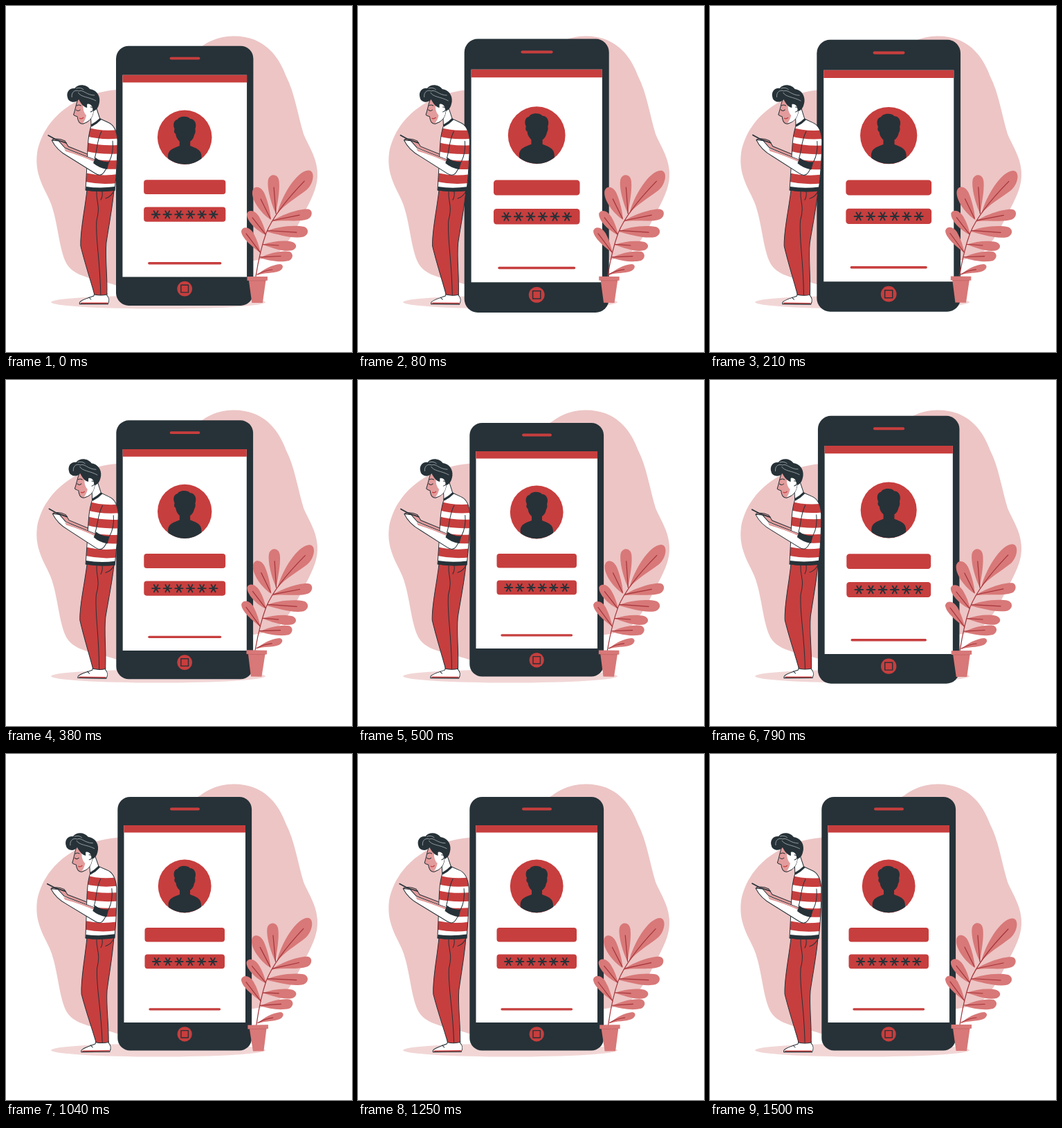
These frames come from a looping animation (500x500 px, 1540 ms). An HTML page:

```html
<!DOCTYPE html>
<html lang="en">
<head>
<meta charset="utf-8">
<title>Login</title>
<style>
  html, body { margin: 0; height: 100%; overflow: hidden; background: #fff; }
  svg { display: block; width: 100vw; height: 100vh; }
  .red { fill: #c73e3e; }
  .dark { fill: #263238; }
  .line { fill: none; stroke: #263238; stroke-width: 1; stroke-linecap: round; stroke-linejoin: round; }
  .skin { fill: #fff; stroke: #263238; stroke-linejoin: round; }
  .shade { fill: #e39c9c; }
  .bar { stroke: #c73e3e; stroke-linecap: round; }
  .leaf { fill: #d87878; }
  .vein { fill: none; stroke: #a4343a; stroke-width: 1.2; stroke-linecap: round; }
</style>
</head>
<body>
<svg viewBox="0 0 500 500">
  <defs>
    <path id="torso" d="M123 173C118 188 118 205 117 228L115 266Q136 269 157 266C160 240 161 215 161 194C160 180 155 171 147 168L136 163Z"/>
    <clipPath id="torsoClip"><use href="#torso"/></clipPath>
    <path id="star" d="M-5.6 0H5.6M-2.9-5L2.9 5M2.9-5L-2.9 5"/>
  </defs>

  <path fill="#edc5c5" d="M160 121C110 125 56 155 45 212C40 250 62 270 68 295C76 322 78 360 90 376C105 394 130 393 160 404L300 380C340 364 380 374 400 350C414 333 422 316 434 293C443 275 451 260 450 240C449 218 436 200 430 185C421 155 417 125 405 102C395 75 375 43 328 43.5C305 44 290 53 282 59L200 110Z"/>
  <ellipse fill="#f2d6d6" cx="220" cy="428" rx="155" ry="9.6"/>

  <g id="phone">
    <rect class="dark" x="161.3" y="62" width="193.8" height="366.6" rx="18"/>
    <path fill="#fff" d="M170.5 103H346V388H170.5Z"/>
    <path class="red" d="M170.5 103H346V113.5H170.5Z"/>
    <path class="bar" stroke-width="3.8" d="M239 79.5H278"/>
    <path class="bar" stroke-width="3.3" d="M208 368.8H308.5"/>
    <circle class="red" cx="258.2" cy="191" r="38.4"/>
    <path class="dark" d="M235 221.4C233 209 241 207 251 203V197C247 193 246 190 245.500 186C243 185 243 181 244 179.500C241 173 243 167 248 166C250 161 262 160 266 165C272 165 276 172 273 179.500C274 182 273 186 272 187C271 192 269 195 266 197V203C276 207 283 209 282 221A38.4 38.4 0 0 1 235 221.400Z"/>
    <rect class="red" x="200.5" y="251" width="115.500" height="20.500" rx="4"/>
    <rect class="red" x="200.5" y="289.500" width="115.500" height="20.800" rx="4"/>
    <g id="stars" class="line" style="stroke-width:1.8"></g>
    <circle class="red" cx="258.200" cy="404.800" r="10.600"/>
    <rect class="line" style="stroke-width:1.4" x="253" y="399.600" width="10.400" height="10.400"/>
  </g>

  <g id="man">
    <path class="skin" d="M128 415L127 419C120 422 109 424 106.500 428.500V430.500H147.500C150 426 149 421 146 418V415Z"/>
    <path stroke="#c73e3e" stroke-width="1.6" d="M108 429.300H147"/>
    <path class="line" d="M106.500 430.700H147.500M120 421L123 424"/>
    <path class="red" stroke="#263238" d="M117 266C114 295 107 325 108 347C114 372 122 395 128 417Q137 419 146 417C147 390 143 365 145 342C149 315 154 290 156 266Z"/>
    <path class="line" d="M131 267C130 285 137 287 131 310C129 335 136 365 137 417M139 268C140 275 137 280 137 280M156 267C153 274 147 277 144 278"/>

    <path class="skin" d="M122 152L123 174L136 164L130 146Z"/>
    <path class="shade" stroke="#263238" d="M104 134C101 142 100 150 97.500 157C99 159.500 102 159 103 160C104 168 107 171 112 170C119 168 125 162 126 153L130 140L112 130Z"/>
    <path fill="#fff" d="M113 137C110 144 111 153 116 158C115 163 113 167 111 169C119 168 125 162 126 153L129 142Z"/>
    <path class="line" d="M101 150Q104 153 107 150M102 144Q105 142 108 144M122 146C127 145 127 152 122 153"/>
    <path fill="none" stroke="#c73e3e" stroke-width="1.300" d="M106 162Q109 164 112 161"/>
    <path class="dark" d="M89 133C86 124 92 118 99 119C104 112 116 113 121 120C130 121 136 129 135 138C134 145 132 150 126 152C126 145 121 140 117 142V147C112 146 108 141 105 135C99 142 90 138 89 133Z"/>
    <path fill="none" stroke="#bfc5c8" stroke-width=".7" d="M95 132C94 123 101 121 105 123C111 120 116 129 128 129M104 125C108 132 119 131 130 137M101 119Q108 117 112 121"/>

    <path class="shade" stroke="#263238" d="M67 193C74 191 81 193 85 195L90 203L120 215L118 224L88 214Q76 207 67 193Z"/>
    <use href="#torso" fill="#fff"/>
    <path clip-path="url(#torsoClip)" fill="none" stroke="#c73e3e" stroke-width="12.500" d="M114 181Q137 188 164 185M114 203Q137 209 164 207M114 225Q137 231 164 229M112 247Q137 253 164 249"/>
    <path class="dark" d="M115.500 261Q136 264 157.500 261V267Q136 269.500 115 266.500Z"/>
    <use href="#torso" class="line"/>
    <path fill="none" stroke="#263238" stroke-width="3.200" d="M123 173Q131 169 136.500 163"/>
    <path class="skin" d="M66 194C71 204 78 211 89 217L129 242C137 247 141 243 145 234L128 222L92 208L85 205L76 195Z"/>
    <path class="shade" d="M84 206L128 222L134 228Q108 216 86 210Z"/>
    <path class="dark" d="M129 219Q138 226 149 225L146 236Q134 234 126 227Z"/>
    <path class="line" d="M138 181C131 194 132 208 128 220M149 225C154 215 155 204 154 195"/>
    <path class="line" style="stroke-width:1.700" d="M61 187L72 193L87 198"/>
  </g>

  <g id="plant">
    <path class="leaf" d="M392 300C398 275 420 238 437 237.500C448 238 444 258 434 266C420 277 402 287 392 300ZM390 300C384 288 376 262 379 250C382 242 393 242 394.500 253C396 268 392 285 390 300ZM383 309C372 303 354 282 356 268C358 259 368 260 373 270C378 281 382 297 383 309ZM383 312C396 302 425 292 437 293.500C444 295 443 305 436 308C422 313 400 308 383 312ZM376 331C362 325 347 310 348 300C351 293 361 296 366 305C371 313 374 322 376 331ZM376 326C390 319 415 316 431 319C438 322 438 330 430 333.500C415 337 392 330 376 326ZM368 357C356 348 340 335 340 325C343 317 353 320 358 329C363 338 366 348 368 357ZM371 345C385 340 402 338 414 341C421 344 421 350 414 353C402 356 386 350 371 345ZM367 364C380 357 398 353 410 355C416 358 415 365 409 368C396 371 380 368 367 364ZM363 389C372 380 385 374 396 373C402 374 401 380 395 383C385 387 373 385 363 389Z"/>
    <path class="vein" d="M361 391C364 372 368 350 376 328C384 308 405 280 431 253M390 300L387 262M382 307L368 279M385 310L424 302M375 330L356 306M378 324.500L420 327M368 357L347 329M371 344.500L394 346M367 363L397 361.500M363 388Q374 382 385 381"/>
    <path class="leaf" d="M348.500 391H378V396.800H375.500L371 429H355.500L351 396.800H348.500Z"/>
    <path stroke="#c46466" stroke-width=".8" d="M351 397H375.500"/>
  </g>
</svg>
<script>
  const LOOP = 1541.67, FPS = 24;
  // [time in ms, value] pairs, linear in between
  const PULSE = [[-36, 0], [116, 1], [442, 0], [572, 0], [722, 1], [878, 0], [1505, 0], [LOOP, .24]];
  const SWAY = [[-26, 0], [350, 1], [1100, -1], [1518, 0], [LOOP, .06]];
  const $ = id => document.getElementById(id);

  $('stars').innerHTML = Array.from({ length: 6 }, (_, i) =>
    `<use href="#star" x="${217.600 + i * 16.250}" y="300"/>`).join('');

  function valueAt(keys, t) {
    const i = keys.findIndex(k => k[0] > t);
    const [t0, a] = keys[i - 1], [t1, b] = keys[i];
    return a + (b - a) * (t - t0) / (t1 - t0);
  }

  function draw(now) {
    const t = Math.floor((now % LOOP) * FPS / 1000 + .1) % 37 * 1000 / FPS;
    const scale = 1 + .1 * valueAt(PULSE, t), angle = valueAt(SWAY, t);
    $('phone').setAttribute('transform', `translate(258.200 245.300) scale(${scale}) translate(-258.200 -245.300)`);
    $('man').setAttribute('transform', `rotate(${angle} 111 272)`);
    $('plant').setAttribute('transform', `rotate(${angle} 391.500 333)`);
  }

  const start = performance.now();
  function tick() {
    draw(performance.now() - start);
    requestAnimationFrame(tick);
  }
  tick();
</script>
</body>
</html>
```
